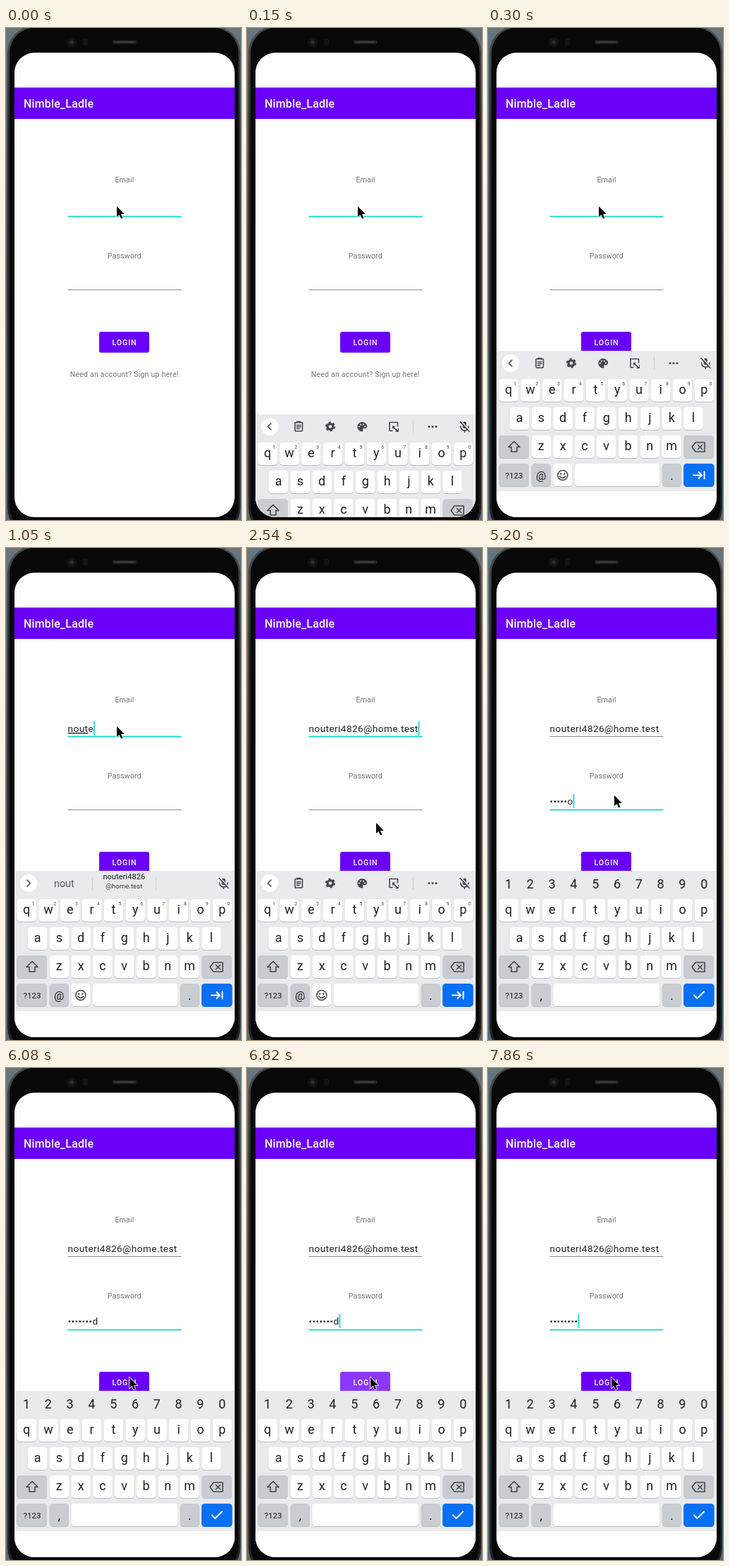
Write an HTML page that moves like this. It is 333 px wide and 698 px high and loops after 8000 ms.

```html
<!DOCTYPE html>
<html lang="en">
<head>
<meta charset="utf-8">
<title>Login screen</title>
<style>
  html, body { margin: 0; width: 100%; height: 100%; overflow: hidden; background: #3d454c; }
  svg { display: block; width: 333px; height: 698px; }
  text { font-family: Roboto, "Liberation Sans", sans-serif; white-space: pre; }
  .mid { text-anchor: middle; }
  .label { font-size: 10.6px; letter-spacing: .19px; fill: #757575; }
  .field { font-size: 13.66px; letter-spacing: .4px; fill: #212121; }
  .field .comp { text-decoration: underline; }
  .key { font-size: 18px; fill: #1d1f22; }
  .hint { font-size: 7px; fill: #44474b; }
  .icon { fill: none; stroke: #44484d; stroke-width: 1.6; stroke-linejoin: round; stroke-linecap: round; }
  .solid { fill: #44484d; stroke: none; }
  .line { stroke: #cfd2d6; stroke-width: 1.2; }
  .white { stroke: #fff; stroke-width: 2; }
</style>
</head>
<body>
<svg viewBox="0 0 333 698">
  <defs>
    <linearGradient id="wall" x2="0" y2="1">
      <stop offset="0" stop-color="#66757f"/>
      <stop offset=".5" stop-color="#4b545b"/>
      <stop offset="1" stop-color="#566b79"/>
    </linearGradient>
    <linearGradient id="rim" x2="0" y2="1">
      <stop offset="0" stop-color="#4a4c4e"/>
      <stop offset=".2" stop-color="#2a2c2e"/>
      <stop offset="1" stop-color="#232527"/>
    </linearGradient>
    <clipPath id="screen"><rect x="12" y="35" width="312" height="659" rx="28.500"/></clipPath>
    <clipPath id="btn"><rect x="132" y="431" width="71" height="29.500" rx="3"/></clipPath>
  </defs>

  <rect width="333" height="698" fill="url(#wall)"/>
  <rect x="2" y="-3" width="330" height="722" rx="38" fill="url(#rim)"/>
  <rect x="5" y="-.5" width="324.500" height="716" rx="36" fill="#080808"/>
  <circle cx="93" cy="20" r="7" fill="#141516"/>
  <circle cx="93" cy="20" r="3" fill="#282b2f"/>
  <rect x="109" y="15" width="7" height="10" rx="2" fill="#121314"/>
  <rect x="151" y="17.5" width="34" height="5" rx="2.5" fill="#262729"/>
  <rect x="155" y="19" width="26" height="2" rx="1" fill="#3a3b3d"/>

  <g clip-path="url(#screen)">
    <rect x="12" y="35" width="312" height="659" fill="#fefefe"/>
    <rect x="12" y="84.5" width="312" height="44.5" fill="#6a00f8"/>
    <text x="25" y="113" font-size="16" font-weight="500" letter-spacing=".15" fill="#fff">Nimble_Ladle</text>

    <text class="label mid" x="168" y="218.500">Email</text>
    <text class="label mid" x="167.800" y="327">Password</text>
    <text class="label mid" x="167.7" y="495">Need an account? Sign up here!</text>
    <rect id="mailLine" x="87.5" width="161"/>
    <rect id="passLine" x="87.5" width="161"/>
    <text id="mail" class="field" x="87.5" y="261"><tspan class="comp"></tspan><tspan></tspan></text>
    <text id="pass" class="field" x="87.5" y="364"></text>
    <rect id="caret" width="1.7" height="20" fill="#12d8c7"/>

    <rect x="132" y="432" width="71" height="29.500" rx="3" fill="#000" opacity=".12"/>
    <g clip-path="url(#btn)">
      <rect x="132" y="431" width="71" height="30" fill="#6a00f8"/>
      <circle id="ripple" cx="175" cy="441" fill="#fff" opacity=".22"/>
    </g>
    <text class="mid" x="168" y="450" font-size="10.6" font-weight="500" letter-spacing=".95" fill="#fff">LOGIN</text>

    <g id="board">
      <rect x="12" y="458" width="312" height="240" fill="#fefefe"/>
      <rect x="12" y="458" width="312" height="199" fill="#e8eaed"/>
      <g id="keys"></g>

      <g class="icon">
        <path d="M37 586.5l8 8h-4v6.5h-8v-6.5h-4z"/>
        <path d="M294 588h13v13h-13l-5-6.5zM297.5 591.5l6 6m0-6l-6 6"/>
      </g>
      <text class="mid" x="37" y="639" font-size="11.5" font-weight="500" fill="#3c4043">?123</text>

      <g id="mailKeys">
        <text class="key mid" x="75.3" y="641" style="font-size:16px">@</text>
        <circle class="icon" cx="105.8" cy="634.5" r="7"/>
        <circle class="solid" cx="103.2" cy="632.5" r="1.3"/>
        <circle class="solid" cx="108.4" cy="632.5" r="1.3"/>
        <path class="icon" d="M102 636q3.8 5 7.6 0"/>
        <path class="icon white" d="M291 634.5h11.5m-4-4.5l4.5 4.5l-4.5 4.5M306.5 629.5v10"/>
      </g>
      <g id="passKeys">
        <text class="key mid" x="75.3" y="641">,</text>
        <path class="icon white" d="M292 634.5l4.5 4.5l9.5-9.5"/>
      </g>

      <g id="bar">
        <circle cx="32" cy="475.5" r="12.3" fill="#fff"/>
        <path id="chevron" class="icon"/>
        <g class="icon">
          <rect class="solid" x="305.8" y="468.5" width="5" height="9.500" rx="2.5"/>
          <path d="M302.5 475q1 6 5.8 6t5.8-6M308.3 481v2.5"/>
          <path d="M303.500 468l12 13" stroke="#e8eaed"/>
          <path d="M302 468.5l13 14"/>
        </g>
      </g>
      <g id="tools" class="icon">
        <rect x="68" y="469.5" width="10.5" height="12.5" rx="1"/>
        <path d="M71 470v-1.5h4.5v1.5M70.5 473.5h5.5M70.5 476h5.5M70.5 478.5h3.5"/>
        <circle class="solid" cx="118" cy="475.5" r="5.6"/>
        <circle cx="118" cy="475.5" r="6" stroke-width="2.2" stroke-dasharray="3.1 3.18" stroke-linecap="butt"/>
        <circle cx="118" cy="475.5" r="2.3" fill="#e8eaed" stroke="none"/>
        <path class="solid" d="M163 469a6.7 6.7 0 1 0 0 13.4c2 0 1.7-1.6 1.1-2.4c-.5-1 0-1.7 1.2-1.7h1.7c2 0 3-1.5 3-3.3c0-3.5-3.3-6-7-6z"/>
        <g fill="#e8eaed" stroke="none">
          <circle cx="159" cy="475.5" r="1.1"/><circle cx="161" cy="472.5" r="1.1"/>
          <circle cx="165" cy="472.5" r="1.1"/><circle cx="167" cy="475.5" r="1.1"/>
        </g>
        <path d="M206 481.500h-4v-12h11.500v5.500"/>
        <path class="solid" d="M206 474.500h4l-1.500 1.500l5.500 5.500v-3.500h1v5h-5l1.500-1.500l-4-4l-1.500 1.500z"/>
        <path class="line" d="M235.5 467v17"/>
        <g class="solid">
          <circle cx="258" cy="475.5" r="1.6"/><circle cx="263" cy="475.5" r="1.6"/><circle cx="268" cy="475.5" r="1.6"/>
        </g>
      </g>
      <g id="suggest">
        <text id="guess" class="mid" x="82.3" y="481" font-size="14.3" fill="#55595f"></text>
        <path class="icon line" d="M122.5 467v18M212.5 467v18"/>
        <text class="mid" x="167.3" y="470" font-size="11" font-weight="500" fill="#3c4043">nouteri4826</text>
        <text class="mid" x="167.3" y="483" font-size="9.7" fill="#3c4043">@home.test</text>
      </g>
      <g id="digits"></g>
    </g>
  </g>

  <path id="mouse" d="M0 0V15L3.500 11.900L6 17.500L8.400 16.400L6 11H10.800Z"
        fill="#000" stroke="#fff" stroke-width="1.5" paint-order="stroke"/>
</svg>

<script>
const $ = id => document.getElementById(id);
const address = "nouteri4826@home.test";
const secret = "password";
const pitch = 30.8;

const label = (x, y, s, cls = "key") => `<text class="${cls} mid" x="${x}" y="${y}">${s}</text>`;
const cap = (x, y, w, fill = "#fff", edge = "#b9bcc1") =>
  `<rect x="${x}" y="${y + 1}" width="${w}" height="32" rx="4.5" fill="${edge}"/>` +
  `<rect x="${x}" y="${y}" width="${w}" height="32" rx="4.5" fill="${fill}"/>`;
const row = (chars, x, y) => [...chars].map((c, i) =>
  cap(x + i * pitch - 13.7, y, 27.4) + label(x + i * pitch, y + 21, c)).join("");

const gray = "#c9ccd1";
const hints = [..."1234567890"];
$("keys").innerHTML =
  row("qwertyuiop", 29.2, 498) + row("asdfghjkl", 44.6, 538) + row("zxcvbnm", 75.3, 578) +
  cap(15.5, 578, 42.5, gray) + cap(277.5, 578, 42.5, gray) +
  cap(15.5, 618, 42.5, gray) + cap(61.7, 618, 27.3, gray) +
  `<g id="narrow">${cap(92.3, 618, 27)}${cap(123, 618, 120.5)}</g>` +
  `<g id="wide">${cap(92.3, 618, 151.2)}</g>` +
  cap(246.8, 618, 27.3, gray) + cap(277.2, 618, 43.2, "#0870f5", "#0a62d2") +
  label(260.4, 641, ".") +
  `<g id="hints">${hints.map((d, i) => label(38.3 + i * pitch, 506.5, d, "hint")).join("")}</g>`;
$("digits").innerHTML = hints.map((d, i) => label(29 + i * pitch, 482.5, d)).join("");

// time, x, y of each pointer stop
const stops = [
  [0, 157, 253], [1350, 163, 310], [1500, 180, 480], [1650, 184, 571], [1800, 175, 510],
  [1950, 168, 470], [2540, 183, 390], [2685, 181, 370], [2830, 179, 351],
  [5635, 180, 368], [5785, 183, 400], [5930, 179, 428], [6080, 175, 439]
];
const mailTimes = [450, 600, 750, 900, 1050];
const passTimes = [4310, 4460, 4600, 4750, 5050, 5200, 5345, 5490];
// caret toggles, starting hidden
const blinks = [450, 1500, 1950, 2685, 2975, 3570, 4020, 5930, 6520, 6960, 7860];
const passFocus = 2975, filled = 2240, masked = 6960;

const passed = (list, t) => list.filter(v => v <= t).length;
const show = (id, on) => $(id).style.display = on ? "" : "none";

function underline(id, y, focus) {
  const el = $(id);
  el.setAttribute("y", focus ? y - .4 : y);
  el.setAttribute("height", focus ? 1.8 : 1);
  el.setAttribute("fill", focus ? "#12d8c7" : "#8b8b8b");
}

function draw(t) {
  const onPass = t >= passFocus;
  const full = t >= filled;
  const typed = passed(mailTimes, t);
  const known = full ? 0 : t >= 1350 ? typed : Math.max(0, typed - 1);
  const [comp, rest] = $("mail").children;
  comp.textContent = address.slice(0, known);
  rest.textContent = address.slice(known, full ? address.length : typed);

  const n = passed(passTimes, t);
  const dots = t >= masked ? n : Math.max(0, n - 1);
  $("pass").textContent = "•".repeat(dots) + secret.slice(dots, n);

  underline("mailLine", 267, !onPass);
  underline("passLine", 371, onPass);

  const field = $(onPass ? "pass" : "mail");
  const width = field.textContent ? field.getComputedTextLength() : 0;
  $("caret").setAttribute("x", 87.4 + width);
  $("caret").setAttribute("y", onPass ? 349 : 246);
  show("caret", passed(blinks, t) % 2);

  const guessing = !onPass && known > 0;
  show("board", t >= 150);
  $("board").setAttribute("transform", `translate(0 ${t < 300 ? 90 : 0})`);
  $("guess").textContent = address.slice(0, known);
  $("chevron").setAttribute("d", guessing ? "M30 471l4.5 4.5l-4.5 4.5" : "M34 471l-4.5 4.5l4.5 4.5");
  show("bar", !onPass);
  show("tools", !onPass && !guessing);
  show("suggest", guessing);
  for (const id of ["mailKeys", "narrow", "hints"]) show(id, !onPass);
  for (const id of ["passKeys", "wide", "digits"]) show(id, onPass);

  $("ripple").setAttribute("r", t < 6665 || t >= 6960 ? 0 : t < 6810 ? 24 : 60);

  const [, x, y] = stops[passed(stops.map(s => s[0]), t) - 1];
  $("mouse").setAttribute("transform", `translate(${x} ${y})`);
}

const start = performance.now();
function tick() {
  draw((performance.now() - start) % 8000);
  requestAnimationFrame(tick);
}
tick();
</script>
</body>
</html>
```
